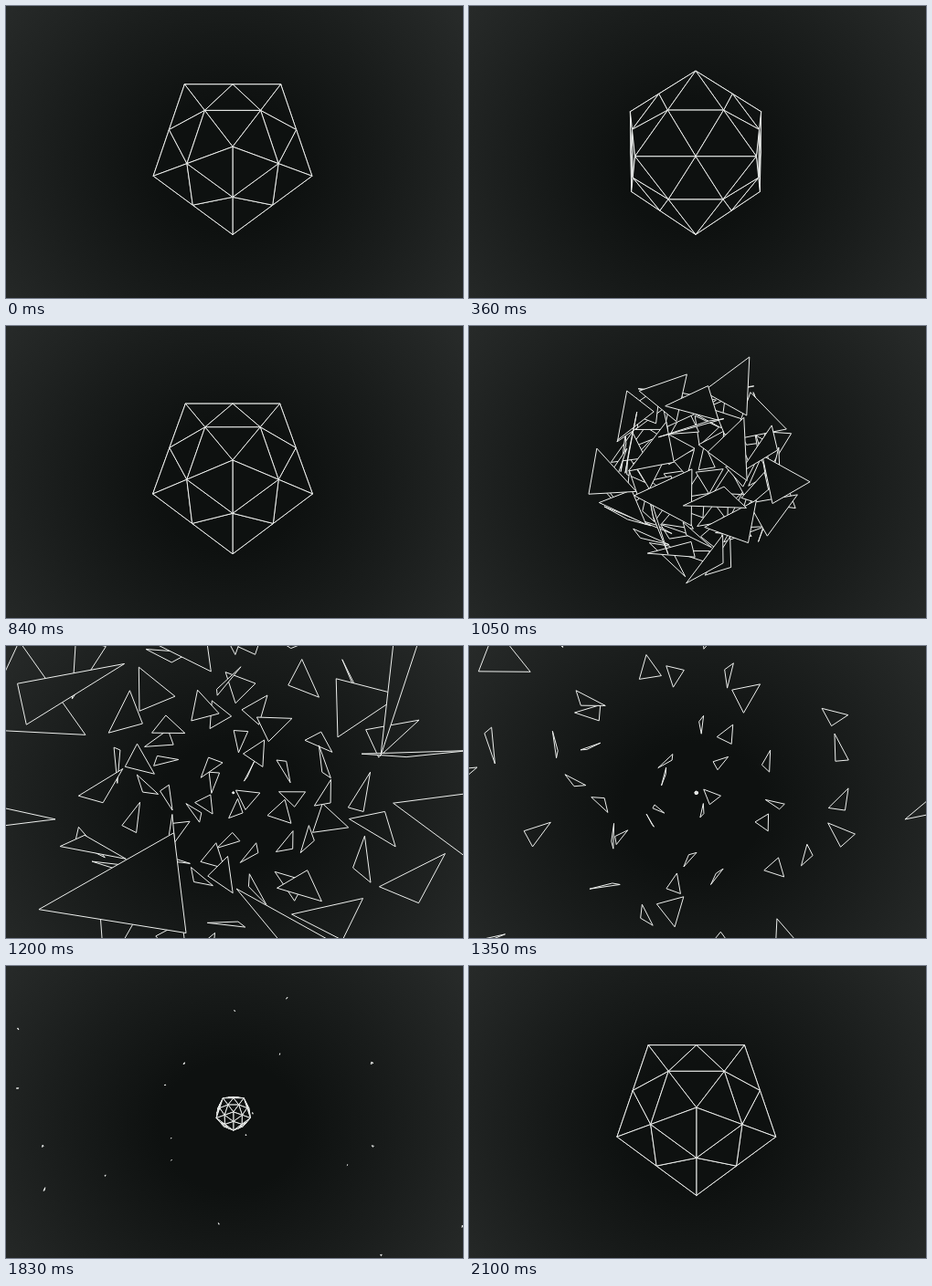
These frames come from a looping animation (500 px wide and 320 px high, 2430 ms). An HTML page with a canvas:

```html
<!DOCTYPE html>
<html lang="en">
<head>
<meta charset="utf-8">
<title>Bursting icosahedron</title>
<style>
  html, body { margin: 0; width: 100%; height: 100%; overflow: hidden; }
  body {
    background: radial-gradient(ellipse 62% 88% at 49% 55%, #0e1110 25%, #1a1d1c 62%, #272a29 100%);
  }
  canvas { display: block; width: 500px; height: 320px; }
</style>
</head>
<body>
<canvas id="stage" width="500" height="320"></canvas>
<script>
const ctx = document.getElementById('stage').getContext('2d');

const LOOP = 2430, END = 2100, STEP = 30;
const BURST = 900;             // spin ends, pieces fly off
const MARK = 450;              // ms after the burst at which travel and spin count as 1
const FADE = 1000;             // ms for a piece to shrink away
const FOCAL = 208.5, CAMERA = 2.5, CX = 248, CY = 160;
const TILT = -2.4 * Math.PI / 180;

const add = (a, b) => a.map((v, i) => v + b[i]);
const mul = (a, s) => a.map(v => v * s);
const sub = (a, b) => add(a, mul(b, -1));
const dot = (a, b) => a[0] * b[0] + a[1] * b[1] + a[2] * b[2];
const cross = (a, b) => [
  a[1] * b[2] - a[2] * b[1], a[2] * b[0] - a[0] * b[2], a[0] * b[1] - a[1] * b[0]
];
const unit = a => mul(a, 1 / Math.hypot(...a));
const mid = (a, b) => mul(add(a, b), 0.5);
const center = f => mul(add(add(f[0], f[1]), f[2]), 1 / 3);

function turn(p, axis, angle) {
  const c = Math.cos(angle), s = Math.sin(angle);
  return add(add(mul(p, c), mul(cross(axis, p), s)), mul(axis, dot(axis, p) * (1 - c)));
}

let seed = 29;
function random() {
  seed = (seed * 16807) % 2147483647;
  return seed / 2147483647;
}
const scatter = () => [random() - 0.5, random() - 0.5, random() - 0.5];

// Icosahedron with each face split flat into four
function buildFaces() {
  const ring = (k, shift, z) => {
    const a = (72 * k - 90 + shift) * Math.PI / 180, r = 2 / Math.sqrt(5);
    return [r * Math.cos(a), r * Math.sin(a), z / Math.sqrt(5)];
  };
  const front = [0, 0, 1], back = [0, 0, -1], faces = [];
  for (let k = 0; k < 5; k++) {
    const u = ring(k, 0, 1), u2 = ring(k + 1, 0, 1);
    const l = ring(k, 36, -1), l2 = ring(k + 1, 36, -1);
    faces.push([front, u, u2], [u, l, u2], [l, l2, u2], [back, l2, l]);
  }
  return faces.flatMap(([a, b, c]) => {
    const ab = mid(a, b), bc = mid(b, c), ca = mid(c, a);
    return [[a, ab, ca], [ab, b, bc], [ca, bc, c], [ab, bc, ca]];
  });
}

const faces = buildFaces();
const posed = angle => faces.map(f => f.map(p => turn(p, [1, 0, 0], angle)));

// Every face flies outward at its own pace, those facing the camera fastest
const pieces = posed(TILT + Math.PI).map(face => {
  const c = center(face);
  const push = 1.2 + 1.4 * random() + 1.4 * Math.max(0, c[2]);
  return {
    c,
    corners: face.map(p => sub(p, c)),
    travel: add(mul(c, push), mul(scatter(), 0.8)),
    axis: unit(scatter()),
    spin: 0.4 + 2.6 * random()
  };
});

function burst(time) {
  const size = 1 - (time / FADE) ** 2;
  if (size <= 0) return [];
  const x = time / MARK, far = x ** 2.2;
  return pieces.map(p => {
    const at = add(p.c, mul(p.travel, far));
    return p.corners.map(v => add(at, mul(turn(v, p.axis, p.spin * x), size)));
  });
}

function drawFaces(list, dx, dy) {
  const shown = list.filter(f => f.every(p => CAMERA - p[2] > 0.12));
  const range = f => Math.hypot(...sub(center(f), [0, 0, CAMERA]));
  shown.sort((a, b) => range(b) - range(a));
  for (const f of shown) {
    ctx.beginPath();
    for (const [x, y, z] of f) {
      const s = FOCAL / (CAMERA - z);
      ctx.lineTo(CX + dx + x * s, CY + dy - y * s);
    }
    ctx.closePath();
    // Faces hide what lies behind but show the backdrop
    ctx.globalCompositeOperation = 'destination-out';
    ctx.fill();
    ctx.globalCompositeOperation = 'source-over';
    ctx.stroke();
  }
}

function draw(t) {
  ctx.clearRect(0, 0, 500, 320);
  ctx.strokeStyle = '#eef0ee';
  ctx.lineWidth = 1;
  ctx.lineJoin = 'round';
  if (t < BURST) {
    const x = t / BURST;
    const ease = 0.45 * (1 - Math.cos(Math.PI * x)) + 0.1 * x;
    drawFaces(posed(TILT + Math.PI * ease), 0, 0);
    return;
  }
  const flying = burst(t - BURST);
  const behind = f => center(f)[2] < 0;
  drawFaces(flying.filter(behind), 0, 0);
  if (t > 1150) {
    const grow = 2 ** ((t - END) / 135);
    drawFaces(posed(TILT).map(f => f.map(p => mul(p, grow))), 0.8, 0.9);
  }
  drawFaces(flying.filter(f => !behind(f)), 0, 0);
}

const start = performance.now();
function tick() {
  const t = (performance.now() - start) % LOOP;
  draw(Math.min(END, Math.floor(t / STEP) * STEP));
  requestAnimationFrame(tick);
}
tick();
</script>
</body>
</html>
```
